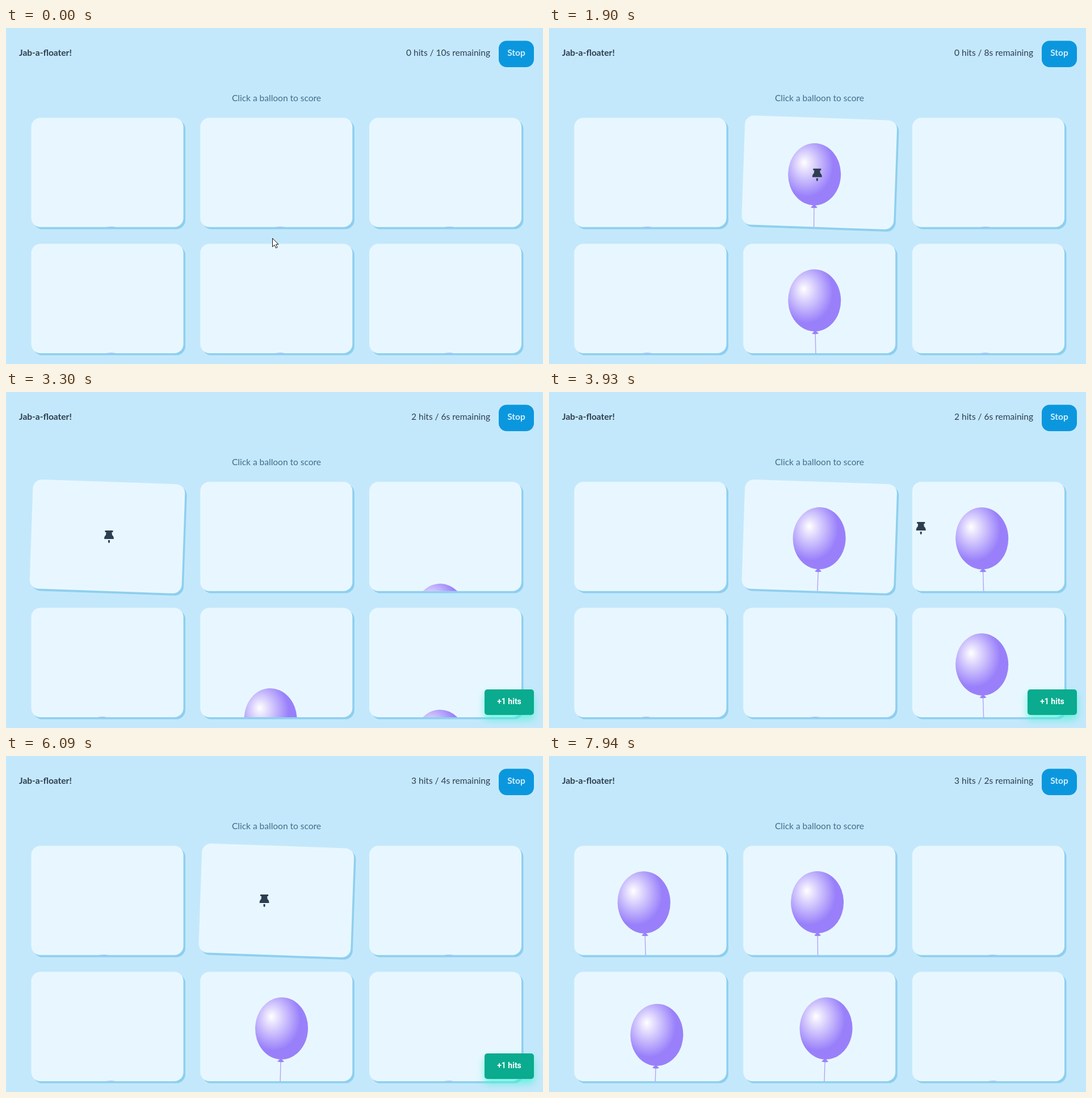
Animation of 946x592 px, one loop 7.96 s. Source, as an HTML page:

```html
<!DOCTYPE html>
<html lang="en">
<head>
<meta charset="utf-8">
<title>Balloon game</title>
<style>
  html, body { margin: 0; height: 100%; overflow: hidden; background: #c4e8fb; }
  svg { display: block; font: 15.5px Lato, sans-serif; fill: #2d3e50; }
  .bold { font-weight: 700; }
  .toast { filter: drop-shadow(0 8px 7px #3df5d0b0); font: 600 14px Roboto, sans-serif; }
</style>
</head>
<body>
<svg width="946" height="592" viewBox="0 0 946 592">
  <defs>
    <radialGradient id="shine" cx=".35" cy=".36" r=".5" fx=".3" fy=".31">
      <stop stop-color="#fff"/>
      <stop offset="1" stop-color="#9980fa"/>
    </radialGradient>
    <clipPath id="cell"><rect width="268" height="192.6" rx="16"/></clipPath>
    <g id="balloon">
      <path d="M134 158V300" stroke="#b5a1fb" stroke-width="1.4"/>
      <path d="M134 152l6 6q-6 2-12 0z" fill="#9980fa"/>
      <ellipse cx="134" cy="99.5" rx="46.5" ry="54.7" fill="url(#shine)"/>
    </g>
  </defs>
  <text class="bold" x="23" y="49">Jab-a-floater!</text>
  <text id="status" x="853" y="49" text-anchor="end"></text>
  <rect x="868" y="22.5" width="62" height="46.5" rx="14" fill="#0b97de"/>
  <text class="bold" x="899" y="49" text-anchor="middle" fill="#d5effc">Stop</text>
  <text x="476.5" y="128.5" text-anchor="middle" fill="#3f6e8c">Click a balloon to score</text>
  <g id="board"></g>
  <g id="toast" class="toast">
    <rect x="843" y="524" width="87" height="45" rx="5" fill="#0aab8f"/>
    <text x="886.5" y="550" text-anchor="middle" fill="#fff">+1 hits</text>
  </g>
  <path id="arrow" d="M.5.5V15.5L4 12.2L6.5 17.7L9 16.6L6.6 11.2H11Z" fill="#fff" stroke="#111"/>
  <path id="pin" d="M-7-11H7V-8H5L5.5-3Q8.5-1 8.5 4H-8.5Q-8.5-1-5.5-3L-5-8H-7ZM-1.5 6H1.5V9.5L0 11.5L-1.5 9.5Z"/>
</svg>
<script>
const LOOP = 7960, WIDTH = 268, HEIGHT = 192.6, TRAVEL = 147;
const SWAY_PERIOD = 8200, SWAY_ANGLE = 2.23, SWAY_LEVER = 360;
const $ = id => document.getElementById(id);

// Edge lists alternate between switch-on and switch-off times.
const cards = [
  { up: [2050, 3050, 4200, 5150, 6880], pops: [3050], hover: [640, 1180, 2510, 3391] },
  { up: [1450, 2350, 3350, 5600, 7000], pops: [2350, 5600], hover: [1196, 2483, 3412, 3915, 4801, 6741] },
  { up: [3250, 5150], pops: [], hover: [3925, 4780, 6771, 7027] },
  { up: [4000, 5200, 7625], pops: [], hover: [] },
  { up: [550, 3100, 5450], pops: [], hover: [] },
  { up: [3250, 5150], pops: [], hover: [7100, 7516] }
];
const hits = [2350, 3050, 5600];
const toastEdges = [2350, 3030, 3080, 4480, 5600, 6800];
const pointer = [
  [400, 469, 370], [600, 328, 366], [700, 250, 300], [1000, 270, 302], [1165, 298, 305],
  [1190, 336, 306], [1500, 470, 262], [2350, 475, 255], [2620, 204, 254], [3050, 170, 255],
  [3300, 180, 255], [3500, 470, 250], [3890, 560, 245], [3930, 655, 240], [4300, 745, 250],
  [4750, 680, 254], [4900, 480, 253], [5050, 463, 253], [6090, 455, 255], [6600, 480, 260],
  [6900, 760, 300], [7350, 790, 480], [7600, 800, 620]
];

const clamp = x => Math.min(1, Math.max(0, x));
const ease = x => {
  const u = clamp(x) * (1.85 - .85 * clamp(x));
  return u * u * (3 - 2 * u);
};
const level = (t, edges, duration) =>
  edges.reduce((sum, edge, i) => sum + (i % 2 ? -1 : 1) * ease((t - edge) / duration), 0);

cards.forEach((card, i) => {
  card.x = 44.5 + 297.75 * (i % 3);
  card.y = i < 3 ? 158.2 : 380.3;
  $('board').insertAdjacentHTML('beforeend', `<g>
    <rect x="3.5" y="3.7" width="${WIDTH}" height="${HEIGHT}" rx="16" fill="#8ecfef"/>
    <rect width="${WIDTH}" height="${HEIGHT}" rx="16" fill="#e8f7ff"/>
    <g clip-path="url(#cell)"><use href="#balloon"/></g></g>`);
  card.node = $('board').lastElementChild;
  card.balloon = card.node.querySelector('use');
});

function drawCard(card, t) {
  const tilt = 2 * level(t, card.hover, 300);
  card.node.setAttribute('transform',
    `translate(${card.x} ${card.y}) rotate(${tilt} ${WIDTH / 2} ${HEIGHT / 2})`);

  // A popped balloon hides until its next rise; its sway restarts two seconds later.
  const pop = card.pops.filter(p => p <= t).pop();
  const hidden = pop && !card.up.some((edge, i) => i % 2 === 0 && edge > pop && edge <= t);
  const swayTime = pop ? Math.max(0, t - pop - 2000) : t - 1050;
  const sway = -SWAY_ANGLE * Math.sin(swayTime / SWAY_PERIOD * 2 * Math.PI);
  const drop = TRAVEL * (1 - level(t, card.up, 500));
  card.balloon.setAttribute('transform',
    `rotate(${sway} ${WIDTH / 2} ${99.5 + SWAY_LEVER}) translate(0 ${drop})`);
  card.balloon.setAttribute('visibility', hidden ? 'hidden' : 'visible');
}

function pointerAt(t) {
  const next = pointer.findIndex(p => p[0] > t);
  if (next < 1) return pointer.at(next).slice(1);
  const [t0, x0, y0] = pointer[next - 1], [t1, x1, y1] = pointer[next];
  const k = (t - t0) / (t1 - t0);
  return [x0 + (x1 - x0) * k, y0 + (y1 - y0) * k];
}

function draw(now) {
  const t = now % LOOP;
  cards.forEach(card => drawCard(card, t));

  const seconds = t < 400 ? 10 : 9 - Math.max(0, Math.floor((t - 265) / 984));
  $('status').textContent = `${hits.filter(h => h <= t).length} hits / ${seconds}s remaining`;
  $('toast').style.opacity = clamp(level(t, toastEdges, 220));

  const [x, y] = pointerAt(t);
  const inside = cards.some(c => x > c.x && x < c.x + WIDTH && y > c.y && y < c.y + HEIGHT);
  for (const id of ['arrow', 'pin']) {
    $(id).setAttribute('transform', `translate(${x} ${y})`);
    $(id).setAttribute('visibility', inside === (id === 'pin') ? 'visible' : 'hidden');
  }
  requestAnimationFrame(draw);
}
requestAnimationFrame(draw);
</script>
</body>
</html>
```
